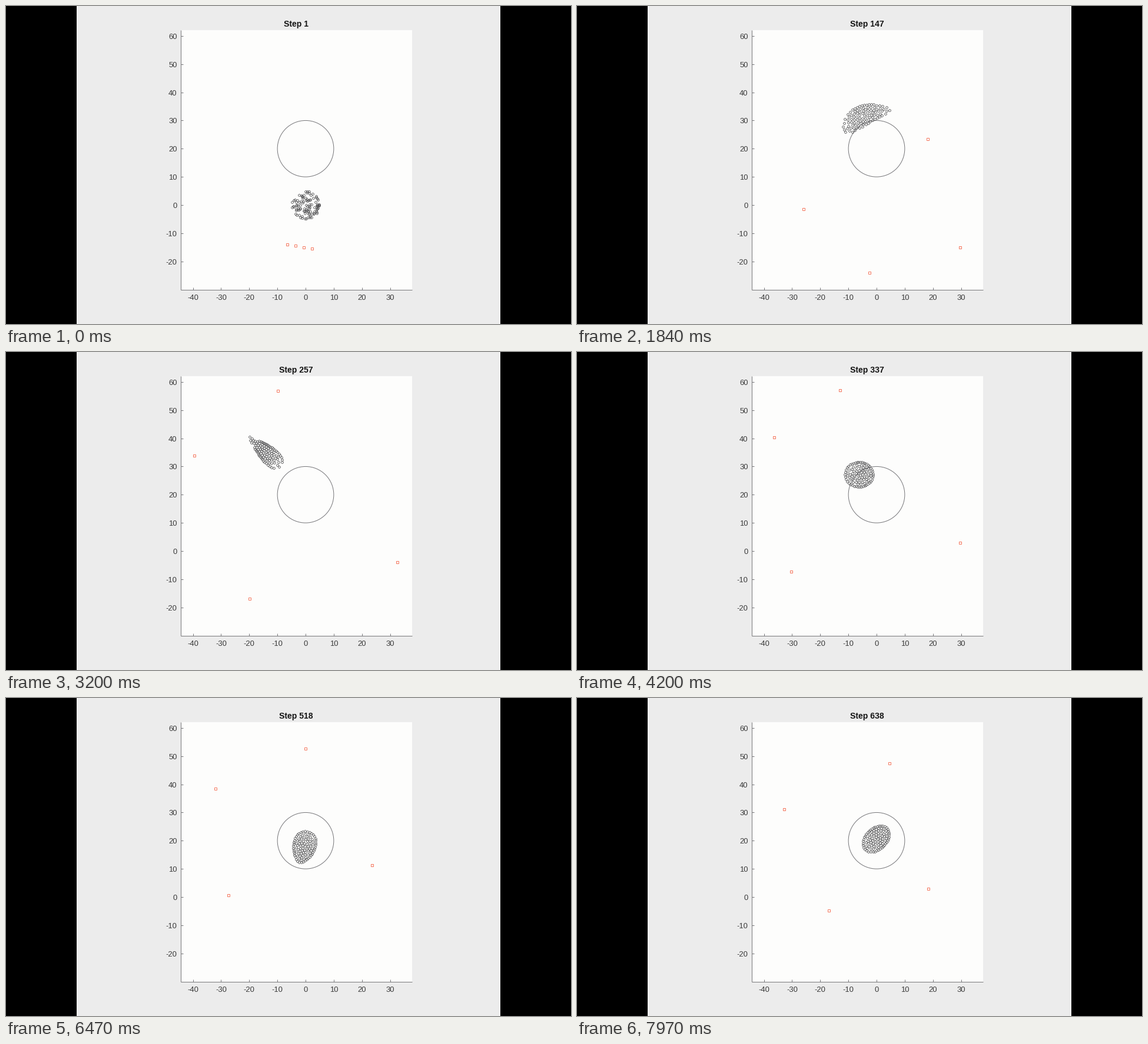
Write a matplotlib script that moves like this. It is 960 by 540 pixels and loops after 8 s.

```python
import numpy as np
import matplotlib.pyplot as plt
from matplotlib.animation import FuncAnimation
from matplotlib.patches import Circle, Rectangle

W, H, DPI = 960, 540, 100
FRAMES, LOOP = 240, 8000
PX = 72 / DPI                      # points per pixel
X0, Y0, UNIT = 509, 338, 4.785     # data origin and scale in pixels
LEFT, RIGHT, TOP, BOTTOM = 296.5, 690, 41, 481.5

PAPER, PLOT, INK, AXIS = "#ececec", "#fdfdfc", "#3a3a3a", "#77777a"
SHEEP, DOG = "#4c4c4e", "#f47a62"

plt.rcParams["font.family"] = "Liberation Sans"
plt.rcParams["axes.unicode_minus"] = False

seconds = np.arange(FRAMES) * LOOP / FRAMES / 1000


def glide(times, keys):
    """Smooth curve through key points, one row per frame."""
    t, keys = np.asarray(times, float), np.asarray(keys, float)
    slope = np.gradient(keys, t, axis=0)
    i = np.clip(np.searchsorted(t, seconds, "right") - 1, 0, len(t) - 2)
    h = (t[i + 1] - t[i])[:, None]
    s = (seconds - t[i])[:, None] / h
    return ((2 * s**3 - 3 * s**2 + 1) * keys[i] + (s**3 - 2 * s**2 + s) * h * slope[i]
            + (3 * s**2 - 2 * s**3) * keys[i + 1] + (s**3 - s**2) * h * slope[i + 1])


# Dogs leave a slanted row and settle into a ring around the flock
DOG_T = [0, 1.833, 3.2, 4.2, 5.4, 7.967]
DOG_PATHS = [
    [(385, 345), (320, 176), (335, 145), (352, 139), (352, 189)],
    [(497, 453), (414, 419), (364, 373), (357, 334), (428, 361)],
    [(651, 410), (665, 357), (651, 324), (638, 279), (597, 324)],
    [(596, 226), (462, 66), (447, 65), (487, 72), (531, 111)],
]
herders = np.stack([glide(DOG_T, [(478 + 14 * n, 405 + 2.3 * n)] + path)
                    for n, path in enumerate(DOG_PATHS)], axis=1)

# Flock outline: centre x, y, half length, half width, tilt in degrees, taper, bend
FLOCK = {
    0.000: (509, 338, 24, 24, 0, 0, 0),
    1.833: (489, 187, 43, 16, -24, -0.35, 10),
    3.200: (440, 169, 36, 12, 43, 0.6, 0),
    4.200: (479, 208, 24, 21, 0, 0, 0),
    5.400: (507, 229, 28, 18, -42, -0.1, 0),
    6.467: (506, 253, 27, 18, -75, 0.25, 0),
    7.967: (508, 239, 26, 18, -45, 0, 0),
}
outline = glide(list(FLOCK), list(FLOCK.values()))


def spread(unit, form):
    """Unit disc to flock outline, before tilting."""
    _, _, a, b, _, taper, bend = form
    u, v = unit.T
    return np.c_[a * u, b * v * (1 + taper * u) + bend * (u**2 - 0.3)]


def gather(p, form):
    """Inverse of spread, kept inside the disc."""
    _, _, a, b, _, taper, bend = form
    u = np.clip(p[:, 0] / a, -1, 1)
    v = (p[:, 1] - bend * (u**2 - 0.3)) / (b * (1 + taper * u))
    return np.c_[u, v] / np.maximum(np.hypot(u, v), 1)[:, None]


def place(p, form):
    c, s = np.cos(np.radians(form[4])), np.sin(np.radians(form[4]))
    return p @ np.array([[c, s], [-s, c]]) + form[:2]


def herd_sheep(count=100):
    """Carry the sheep along with the outline while they keep their distance."""
    rng = np.random.default_rng(12)
    r, th = np.sqrt(rng.random(count)), 2 * np.pi * rng.random(count)
    unit = np.c_[r * np.cos(th), r * np.sin(th)]
    track = []
    for f, form in enumerate(outline):
        gap = 1.06 * np.sqrt(1.155 * np.pi * form[2] * form[3] / count)
        gain = 0.22 * min(1, f / 45) ** 1.5
        for _ in range(8):
            p = spread(unit, form)
            d = p[:, None] - p[None]
            dist = np.hypot(d[..., 0], d[..., 1]) + 1e-6
            push = np.clip(gap - dist, 0, None) / dist
            unit = gather(p + gain * np.einsum("ij,ijk->ik", push, d), form)
        track.append(place(spread(unit, form), form))
    return track


sheep = herd_sheep()

# Stage
fig = plt.figure(figsize=(W / DPI, H / DPI), dpi=DPI, facecolor="black")
ax = fig.add_axes([0, 0, 1, 1])
ax.set_xlim(0, W)
ax.set_ylim(H, 0)
ax.axis("off")


def line(xs, ys):
    ax.plot(xs, ys, color=AXIS, lw=1 * PX, solid_capstyle="butt")


def label(x, y, text, ha):
    ax.text(x, y, text, size=13 * PX, color=INK, ha=ha, va="center_baseline")


ax.add_patch(Rectangle((120, 0), 720, H, fc=PAPER, lw=0))
ax.add_patch(Rectangle((LEFT, TOP), RIGHT - LEFT, BOTTOM - TOP, fc=PLOT, lw=0))
line([LEFT, LEFT], [TOP, BOTTOM])
line([LEFT, RIGHT], [BOTTOM, BOTTOM])
for v in range(-40, 31, 10):
    x = X0 + v * UNIT
    line([x, x], [BOTTOM, BOTTOM - 4])
    label(x, 494.5, str(v), "center")
for v in range(-20, 61, 10):
    y = Y0 - v * UNIT
    line([LEFT, LEFT + 4], [y, y])
    label(290.5, y + 0.5, str(v), "right")
ax.add_patch(Circle((X0, Y0 - 20 * UNIT), 10 * UNIT, fill=False, ec=AXIS, lw=1 * PX))

title = ax.text(493, 35, "", size=14 * PX, weight="bold", color="#141414",
                ha="center", va="baseline")
flock, = ax.plot([], [], "o", ms=3.7 * PX, mfc="none", mec=SHEEP, mew=0.8 * PX)
dogs, = ax.plot([], [], "s", ms=5 * PX, mfc="none", mec=DOG, mew=1 * PX)


def draw(f):
    title.set_text(f"Step {1 + f * 8 // 3}")
    flock.set_data(*sheep[f].T)
    dogs.set_data(*herders[f].T)
    return title, flock, dogs


anim = FuncAnimation(fig, draw, frames=FRAMES, interval=LOOP / FRAMES,
                     repeat=True, repeat_delay=0, blit=False)
plt.show()
```
